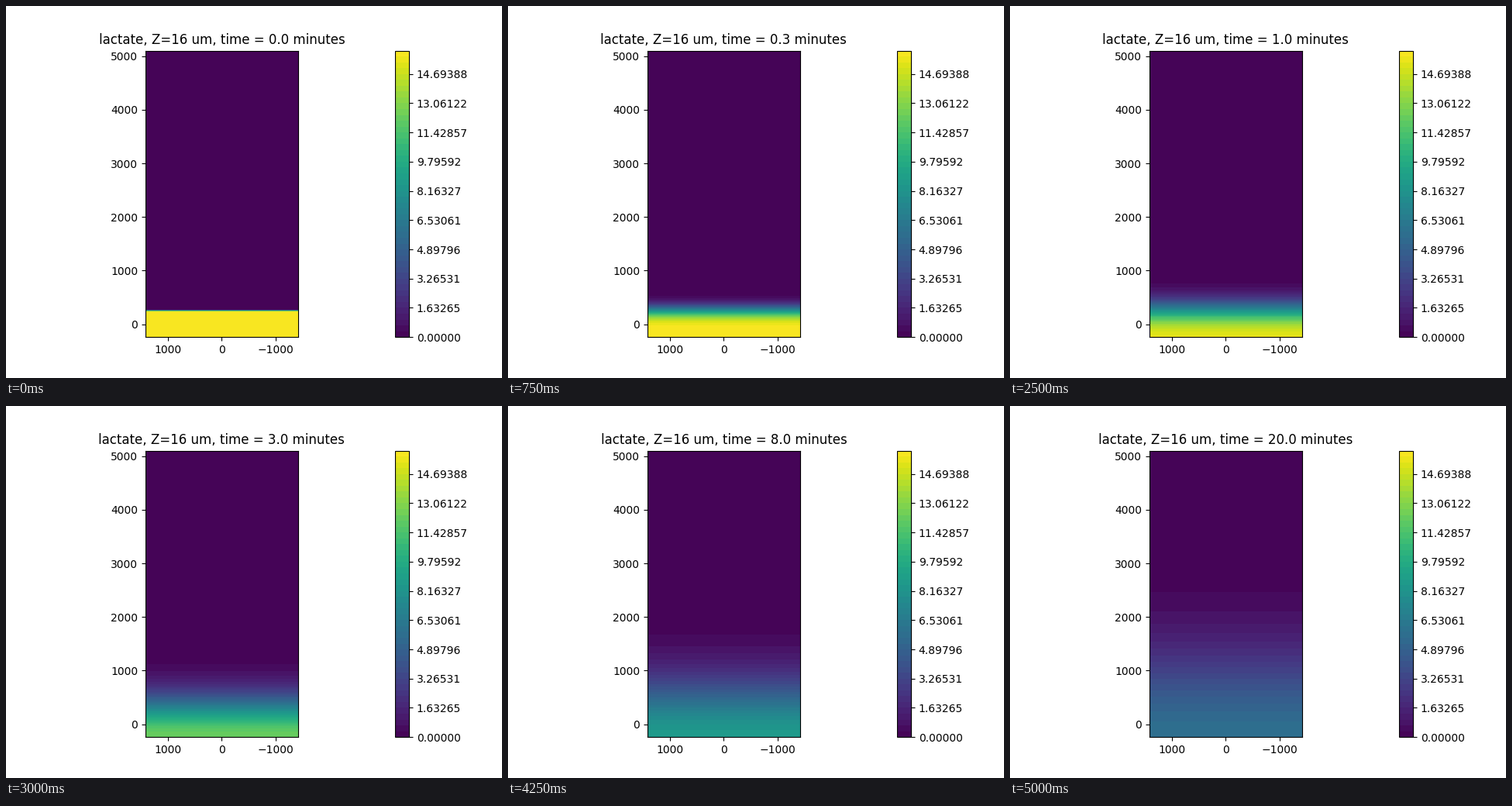
A matplotlib script that plays this animation: 640x480 px, repeating every 5.25 s.

```python
import numpy as np
import matplotlib.pyplot as plt
from matplotlib.animation import FuncAnimation

DX = 32              # voxel size, um
N = 168              # voxels along y
FILLED = 16          # voxels holding lactate at the start
C0 = 16.0            # starting concentration
D = 500 * 60         # diffusion coefficient, um^2 / min

TIMES = np.concatenate([np.arange(11) / 10, np.arange(2, 11), [20]])
LEVELS = np.linspace(0, C0, 50)

y = -240 + DX * np.arange(N)
x = np.array([-1424, 1424])

# Closed-wall diffusion solved in cosine modes
k = np.arange(N)
modes = np.cos(np.pi * np.outer(k + 0.5, k) / N)
start = np.where(k < FILLED, C0, 0.0)
weights = modes.T @ start * np.where(k == 0, 1, 2) / N
rates = 2 * D / DX**2 * (1 - np.cos(np.pi * k / N))


def profile(t):
    if t == 0:
        return start
    return np.clip(modes @ (weights * np.exp(-rates * t)), 0, C0)


def draw_field(t):
    field = np.repeat(profile(t)[:, None], 2, axis=1)
    ax.set_title(f"lactate, Z=16 um, time = {t:.1f} minutes")
    return ax.contourf(x, y, field, levels=LEVELS, cmap="viridis")


def set_view():
    ax.set_xlim(x[1], x[0])
    ax.set_ylim(y[0], y[-1])


def update(i):
    for old in list(ax.collections):
        old.remove()
    draw_field(TIMES[i])
    set_view()
    return []


plt.rcParams["font.family"] = "DejaVu Sans"
plt.rcParams["text.kerning_factor"] = 6
fig, ax = plt.subplots(figsize=(6.4, 4.8), dpi=100)
bar = fig.colorbar(draw_field(0), ax=ax, ticks=LEVELS[::5], format="%.5f",
                   panchor=False)
bar.minorticks_off()
ax.set_aspect("equal", anchor="C")
ax.set_xticks([1000, 0, -1000])
ax.set_yticks(range(0, 5001, 1000))
set_view()

anim = FuncAnimation(fig, update, frames=len(TIMES), init_func=lambda: [],
                     interval=250, repeat=True, repeat_delay=0)
plt.show()
```
